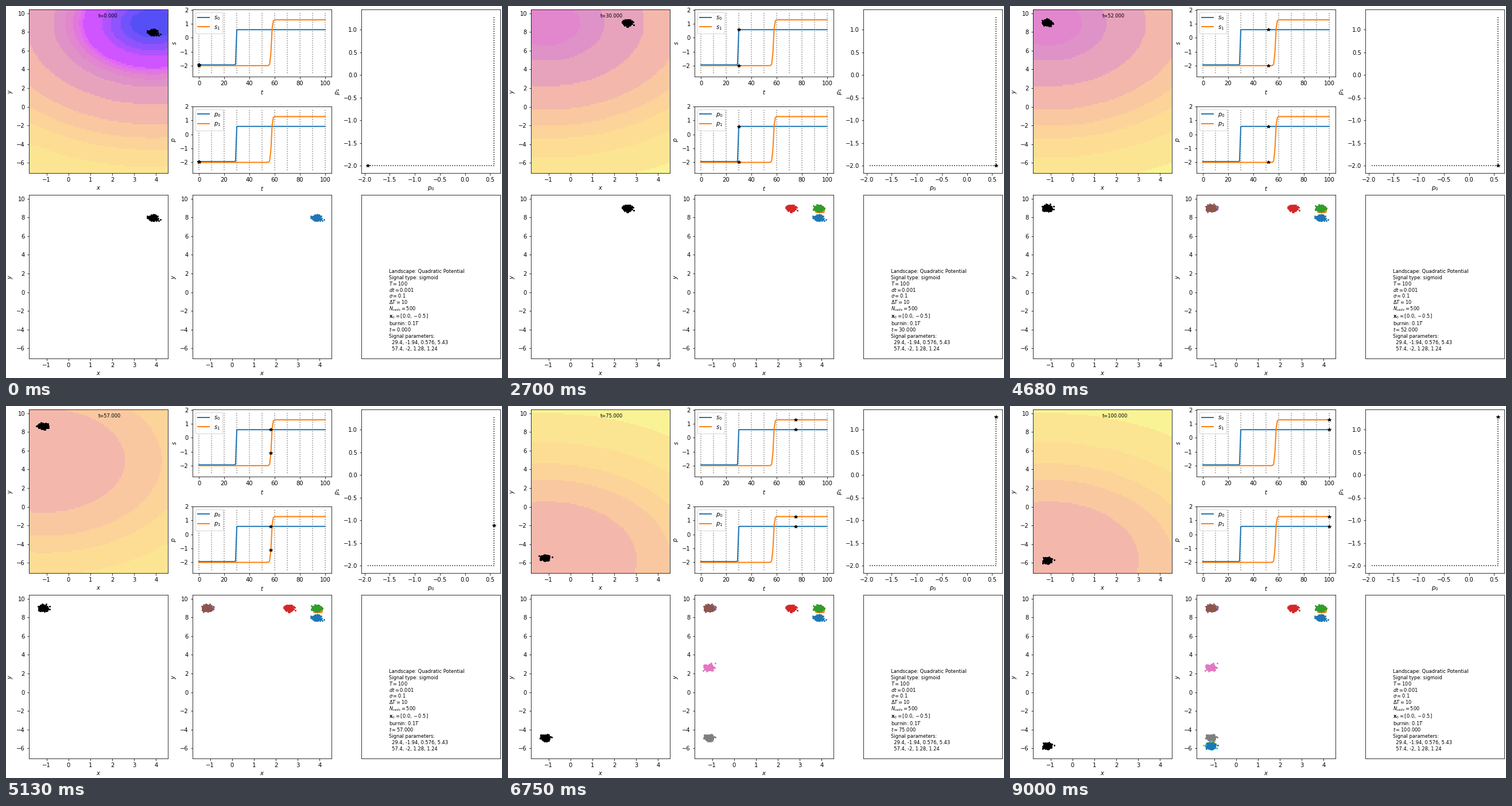
These frames come from a looping animation (864x648 px, 9.09 s). A matplotlib script:

```python
import numpy as np
import matplotlib.pyplot as plt
from matplotlib.animation import FuncAnimation
from matplotlib.colors import BoundaryNorm, ListedColormap

W, H, DPI = 864, 648, 72
T, STEP, CELLS = 100, 10, 500
NOISE, DT = 0.085, 0.02
SIGNALS = [(29.4, -1.94, 0.576, 5.43), (57.4, -2, 1.28, 1.24)]
STIFF = np.array([1 / 2, 2 / 9])
XLIM, YLIM = (-1.8, 4.54), (-7.1, 10.42)

# Colour bands of the potential, from low to high
LEVELS = [-20, -12.5, -12.2, -11.8, -11.4, -10.2, -9.9, -9.4, -8.7, -7.5,
          -4.2, 0.4, 4.3, 8, 14, 24, 60]
BANDS = ["#564ff6", "#7252fa", "#9053fd", "#ae54ff", "#ce55ff", "#e466f5",
         "#e078e0", "#e286ce", "#de92c8", "#e8a3bc", "#f3b7ac", "#fac8a0",
         "#fcd398", "#fddd93", "#fce592", "#f9f396"]


def signal(t):
    """Both sigmoid signals at time t."""
    return np.array([a + (b - a) * 0.5 * (1 + np.tanh(r * (t - tc)))
                     for tc, a, b, r in SIGNALS])


def simulate():
    """Cell positions at every whole time, after a burn-in of T / 10."""
    rng = np.random.default_rng(4)
    cells = np.tile([0.0, -0.5], (CELLS, 1))
    per_unit = round(1 / DT)
    history = []
    for n in range(-T // 10 * per_unit, T * per_unit + 1):
        if n == 0:
            cells[0] = 4.2, 7.8  # one stray cell
        if n >= 0 and n % per_unit == 0:
            history.append(cells.copy())
        p = signal(max(n, 0) * DT)
        kick = rng.normal(size=cells.shape)
        cells += -(STIFF * cells + p) * DT + NOISE * np.sqrt(DT) * kick
    return history


gx, gy = np.meshgrid(np.linspace(*XLIM, 100), np.linspace(*YLIM, 100))


def potential(t):
    p0, p1 = signal(t)
    return gx**2 / 4 + gy**2 / 9 + p0 * gx + p1 * gy


fig = plt.figure(figsize=(W / DPI, H / DPI), dpi=DPI)


def panel(left, top, height, xlabel="", ylabel=""):
    ax = fig.add_axes([left / W, (H - top - height) / H, 242 / W, height / H])
    ax.set_xlabel(xlabel)
    ax.set_ylabel(ylabel)
    return ax


def plane(left, top):
    ax = panel(left, top, 285, "$x$", "$y$")
    ax.set(xlim=XLIM, ylim=YLIM)
    return ax


def dots(ax, color):
    return ax.plot([], [], "o", color=color, ms=3, mew=0)[0]


def star(ax):
    return ax.plot([], [], "k*", ms=6, zorder=4)[0]


def write_notes():
    """Write the parameter list upwards; return the line that shows t."""
    start = r"$\mathbf{x}_0=[0.0, -0.5]$"
    head = ["Landscape: Quadratic Potential", "Signal type: sigmoid",
            f"$T={T}$", "$dt=0.001$", r"$\sigma=0.1$",
            rf"$\Delta T={STEP}$", f"$N_{{cells}}={CELLS}$"]
    tail = ["burnin: $0.1T$", "", "Signal parameters:"]
    tail += ["  " + ", ".join(f"{v:.3g}" for v in s) for s in SIGNALS]
    y, gap, wide = 48.2, 10.9, 13
    clock = None
    for line in reversed(head + [start] + tail):
        text = fig.text(667.4 / W, y / H, line, fontsize="small")
        if not line:
            clock = text
        y += wide if line in (start, tail[0]) else gap
    return clock


times = np.arange(T + 1)
curves = signal(times)
history = simulate()

field = plane(40, 6)
image = field.imshow(potential(0), origin="lower", aspect="auto",
                     interpolation="nearest", extent=(*XLIM, *YLIM),
                     cmap=ListedColormap(BANDS),
                     norm=BoundaryNorm(LEVELS, len(BANDS)))
live = dots(field, "k")
clock = field.text(0.5, 0.95, "", transform=field.transAxes, fontsize="small")

stars = []
for name, top in (("s", 6), ("p", 174.5)):
    ax = panel(325, top, 116.5, "$t$", f"${name}$")
    for i, curve in enumerate(curves):
        ax.plot(times, curve, lw=2, label=f"${name}_{i}$")
    ax.vlines(times[::STEP], -2.545, 1.805, colors="gray", linestyles=":",
              zorder=1)
    ax.set(xlim=(-5, 105), ylim=(-2.764, 2.024), yticks=range(-2, 3))
    ax.legend(loc="upper left")
    stars.append(star(ax))

path = panel(619, 6, 285, "$p_0$", "$p_1$")
path.plot(*curves, "k:")
path_star = star(path)

snapshot = dots(plane(40, 329), "k")
trail_ax = plane(325, 329)
trail = [dots(trail_ax, f"C{i % 10}") for i in range(T // STEP + 1)]

panel(619, 329, 285).set(xticks=[], yticks=[])
note_clock = write_notes()


def update(t):
    p = signal(t)
    image.set_data(potential(t))
    live.set_data(*history[t].T)
    clock.set_text(f"t={t:.3f}")
    note_clock.set_text(f"$t={t:.3f}$")
    for mark in stars:
        mark.set_data([t, t], p)
    path_star.set_data(p[:1], p[1:])
    last = t // STEP
    snapshot.set_data(*history[last * STEP].T)
    for i, cloud in enumerate(trail):
        cloud.set_data(*(history[i * STEP].T if i <= last else ([], [])))


anim = FuncAnimation(fig, update, frames=T + 1, init_func=lambda: update(0),
                     interval=90, repeat=True, repeat_delay=0)
plt.show()
```
